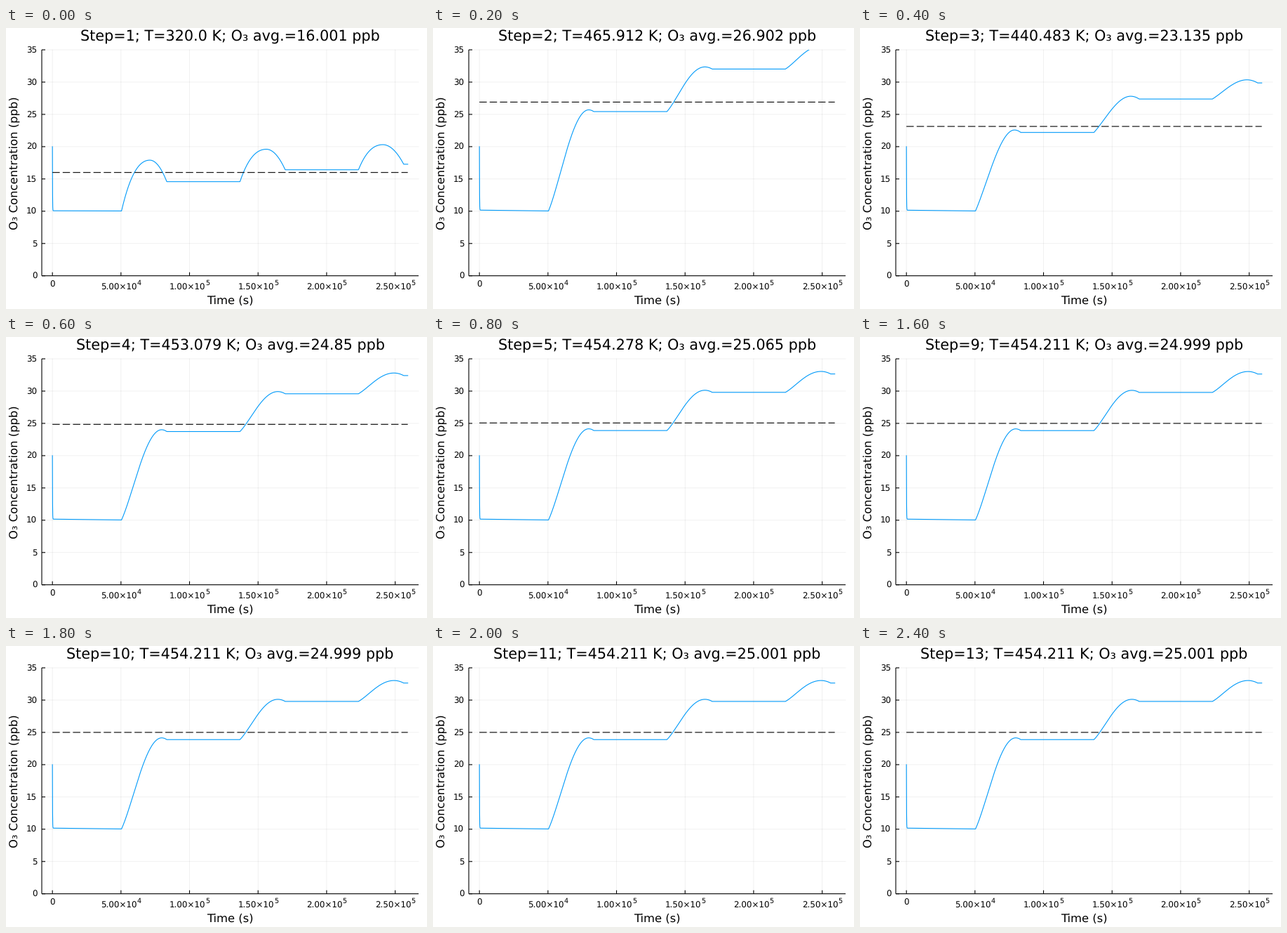
Recreate the animation shown at these times as a matplotlib script. Size 600x400 px, loop 2.6 s.

```python
import matplotlib.pyplot as plt
import numpy as np
from matplotlib.animation import FuncAnimation
from matplotlib.patches import Rectangle

plt.rcParams["font.family"] = "DejaVu Sans"
plt.rcParams["text.hinting"] = "none"
plt.rcParams["path.snap"] = False

PT = 0.72  # points per pixel at 100 dpi
LEFT, RIGHT, TOP, BOTTOM = 51, 588, 31, 352.7
DAY, SUNRISE, SUNSET, END = 86400, 50400, 83400, 259200
COOL, HOT = 320, 454.2
DAWN_LEVEL = 10.04

# temperature (K) and mean ozone (ppb) as the search closes in on 25 ppb
STEPS = [(320.0, 16.001), (465.912, 26.902), (440.483, 23.135),
         (453.079, 24.85), (454.278, 25.065), (454.223, 25.012),
         (454.211, 24.989)]
STEPS += [(454.211, 24.999)] * 3 + [(454.211, 25.001)] * 3


def px(t):
    return 66.15 + t * 97.7 / 5e4


def py(v):
    return BOTTOM - 9.19 * v


def mix(a, b, k):
    return a + (b - a) * k


def daytime(s, start, peak_at, peak, end, slope, quartic):
    """Rise from start to a peak, then fall towards the night level."""
    w = 1 - s / peak_at
    cubic = slope - 2 - 2 * quartic
    rise = w**2 * (1 - cubic - quartic + cubic * w + quartic * w**2)
    fall = (w * peak_at / (1 - peak_at))**2
    return np.where(w > 0, peak - (peak - start) * rise, peak - (peak - end) * fall)


def ozone(temp):
    """Three days of ozone as pixel coordinates."""
    warmth = (temp - COOL) / (HOT - COOL)
    yield_gain = warmth**1.845
    nights = mix(np.array([14.58, 16.42, 17.28]),
                 np.array([23.88, 29.79, 32.64]), yield_gain)
    shape = min(warmth, 1)
    slope = mix(2.4, 0.97, shape)
    quartic = -0.62 * shape**7.4

    t = np.append(np.linspace(0, 1000, 40), SUNRISE)
    first_night = mix(10.07 + 0.1 * shape, DAWN_LEVEL, t / SUNRISE)
    times, levels = [t], [first_night + (20 - first_night) * np.exp(-t / 90)]
    s = np.linspace(0, 1, 80)
    level = DAWN_LEVEL
    for day, night in enumerate(nights):
        peak_at = mix(0.626 - 0.043 * day, 0.888 - 0.05 * day, shape)
        overshoot = mix(3.33 - 0.15 * day, 0.27 + 0.06 * day, shape**0.34)
        times.append(day * DAY + mix(SUNRISE, SUNSET, s))
        levels.append(daytime(s, level, peak_at, night + overshoot, night,
                              slope, quartic))
        level = night
    times.append([END])
    levels.append([level])
    return px(np.concatenate(times)), py(np.concatenate(levels))


fig = plt.figure(figsize=(6, 4), dpi=100, facecolor="white")
ax = fig.add_axes([0, 0, 1, 1])
ax.set_xlim(0, 600)
ax.set_ylim(400, 0)
ax.axis("off")


def line(x, y, width=1.1, **style):
    return ax.plot(x, y, lw=width * PT, **style)[0]


def text(x, y, label, size, ha="center", **style):
    return ax.text(x, y, label, fontsize=size * PT, ha=ha, va="baseline", **style)


def black(x, y):
    line(x, y, color="black", solid_capstyle="butt", zorder=2)


def grid(x, y):
    line(x, y, 0.8, color="black", alpha=0.07, zorder=1)


for v in range(0, 36, 5):
    y = py(v)
    grid([LEFT, RIGHT], [y, y])
    black([LEFT, LEFT + 5], [y, y])
    text(44.3, y + 4.4, str(v), 11.9, ha="right")

for i in range(6):
    x = px(i * 5e4)
    grid([x, x], [TOP, BOTTOM])
    black([x, x], [BOTTOM, BOTTOM - 5])
    if i == 0:
        text(x, 368.8, "0", 11.9)
    else:
        mantissa, power = f"{i * 5e4:.2e}".split("e+0")
        text(x - 28.8, 372.5, f"{mantissa}×10", 11.9, ha="left")
        text(x + 22.6, 365.6, power, 9.6, ha="left")

black([LEFT, LEFT], [TOP, BOTTOM])
black([LEFT, RIGHT], [BOTTOM, BOTTOM])
text(319.6, 393, "Time (s)", 16.35)
text(17, 191.7, "O₃ Concentration (ppb)", 16.35, rotation=90, rotation_mode="anchor")

title = text(319.5, 18.6, "", 20.77)
curve = line([], [], color="#009afa", zorder=3)
mean = line([], [], color="black", dashes=(9.5, 3.8), dash_capstyle="butt", zorder=4)
curve.set_clip_path(Rectangle((LEFT, TOP), RIGHT - LEFT, BOTTOM - TOP,
                              transform=ax.transData))


def update(frame):
    temp, average = STEPS[frame]
    title.set_text(f"Step={frame + 1}; T={temp} K; O₃ avg.={average} ppb")
    curve.set_data(*ozone(temp))
    mean.set_data([px(0), px(END)], [py(average)] * 2)
    return title, curve, mean


anim = FuncAnimation(fig, update, frames=len(STEPS), interval=200,
                     repeat=True, repeat_delay=0)
plt.show()
```
